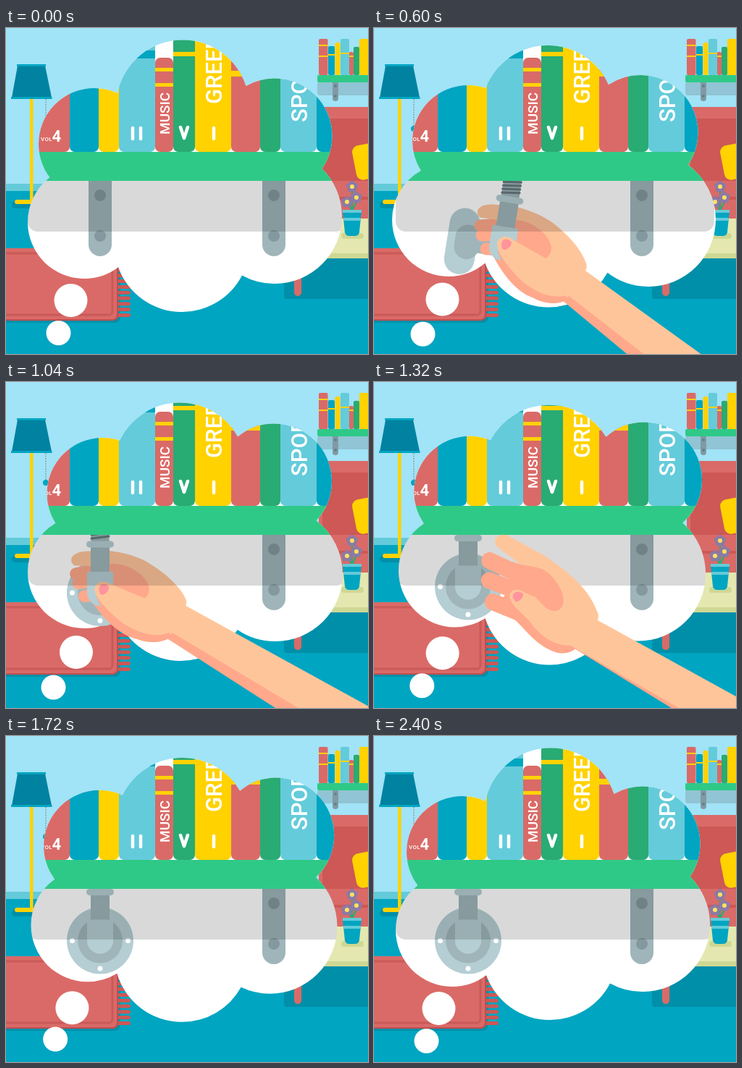
These frames come from a looping animation (500 by 450 pixels, 2480 ms). An HTML page:

```html
<!DOCTYPE html>
<html lang="en">
<head>
<meta charset="utf-8">
<title>Shelf repair</title>
<style>
html, body { margin: 0; width: 100%; height: 100%; overflow: hidden; background: #00a5c1; }
svg { display: block; width: 500px; height: 450px; }
text { font-family: Roboto, Inter, sans-serif; font-weight: 500; fill: #fff; }
.red { fill: #da6a67; } .dred { fill: #cd5855; }
.blue { fill: #00a5c1; } .sky { fill: #64cbda; }
.yel { fill: #ffd200; } .grn { fill: #29ab74; }
.mint { fill: #2fc987; } .deep { fill: #008fa8; }
.metal { fill: #9fb5ba; } .light { fill: #b5ced3; } .hole { fill: #84999f; }
.skin { fill: #ffc59a; } .pink { fill: #ffa88b; } .nail { fill: #ff949c; }
.white { fill: #fff; }
.finger { fill: none; stroke: #ffa88b; stroke-linecap: round; }
.shade { mix-blend-mode: multiply; }
</style>
</head>
<body>
<svg viewBox="0 0 500 450">
<defs>
  <clipPath id="cloud"></clipPath>
  <g id="plate">
    <path class="metal" d="M-16-24H16V68A16 16 0 0 1-16 68Z"/>
    <circle class="hole" r="8"/><circle class="hole" cy="56" r="8"/>
  </g>
</defs>

<!-- room -->
<rect width="500" height="216" fill="#a1e3f7"/>
<rect class="sky" y="215" width="500" height="10"/>
<rect class="blue" y="225" width="500" height="225"/>
<rect class="deep" x="8" y="239" width="50" height="10" rx="5"/>
<rect class="yel" x="33" y="97" width="4.5" height="143"/>
<rect class="yel" x="12" y="237" width="46" height="6" rx="3"/>
<path d="M55 98V136" stroke="#8fb4c0" stroke-width="2" stroke-dasharray="2 1.5"/>
<circle class="blue" cx="55" cy="139" r="4"/>
<path d="M16 52H54L63 96H8Z" fill="#0082a0"/>
<path class="blue" d="M15 50H55V53H15ZM7 95H63.500V98H7Z"/>

<rect class="deep" x="-10" y="306" width="168" height="101" rx="8"/>
<g id="fringe" stroke="#cd5855" stroke-width="5" stroke-linecap="round"></g>
<rect fill="#bd4f51" x="-10" y="304" width="165" height="100" rx="7"/>
<rect class="red" x="-10" y="304" width="163" height="98" rx="6"/>
<rect x="-10" y="311" width="157" height="85" rx="5" fill="none" stroke="#c95a59" stroke-width="3"/>

<rect class="red" x="432" y="109" width="80" height="155" rx="6"/>
<path class="dred" d="M437 125H500V211H437Z"/>
<rect class="red" x="430" y="211" width="80" height="52"/>
<path class="dred" d="M430 233H500V237H430Z"/>
<rect class="yel" x="481" y="160" width="50" height="48" rx="9" transform="rotate(-11 500 185)"/>
<rect class="deep" x="384" y="318" width="130" height="56" rx="4"/>
<rect class="red" x="398" y="340" width="10" height="30" rx="5"/>
<path d="M400 263H500V312H400Z" fill="#e4e8b0"/>
<path d="M400 311H500V318H400Z" fill="#ced894"/>
<rect x="463" y="283" width="31" height="8" rx="4" fill="#ced894"/>
<path d="M478 252V220M478 252L470 238M478 252L486 236" stroke="#29ab74" stroke-width="2" fill="none"/>
<g id="flowers"></g>
<path class="blue" d="M465 253H491L488 282Q487 287 482 287H474Q469 287 468 282Z"/>
<path class="sky" d="M465 251H491V255H465ZM466 262H490L489.500 266H466.500Z"/>

<rect x="430" y="74" width="80" height="19" rx="4" fill="#91c4d4"/>
<path d="M451 75H459V97A4 4 0 0 1 451 97Z" fill="#7f9aa4"/>
<circle cx="455" cy="80" r="2" fill="#64808a"/><circle cx="455" cy="94" r="2" fill="#64808a"/>
<rect class="mint" x="430" y="65" width="80" height="10" rx="2"/>
<g id="smallBooks"></g>

<!-- thought bubble -->
<circle id="dotA" class="white" r="23"/>
<circle id="dotB" class="white" r="17"/>
<g clip-path="url(#cloud)">
  <rect class="white" width="500" height="450"/>
  <g id="books"></g>
  <path d="M175 138V153M186 138V153M287 138V153" stroke="#fff" stroke-width="4.500" stroke-linecap="round"/>
  <path d="M241 137L246 152L251 137" fill="none" stroke="#fff" stroke-width="4.500" stroke-linejoin="round" stroke-linecap="round"/>
  <text x="48" y="156" font-size="8" letter-spacing=".3">VOL</text>
  <text x="63.500" y="157" font-size="22" style="font-weight:700">4</text>
  <text transform="translate(226 147) rotate(-90)" font-size="19" >MUSIC</text>
  <text transform="translate(298 105) rotate(-90)" font-size="31">GREEN</text>
  <text transform="translate(416 130) rotate(-90)" font-size="31">SPORT</text>
  <use href="#plate" x="370" y="231"/>
  <use id="oldStill" href="#plate" x="130" y="231"/>
</g>

<!-- new pipe and the gripping hand -->
<g id="flange">
  <rect id="arm" class="metal" y="-13" height="26"/>
  <rect id="disc" class="light" y="-46" height="92"/>
  <rect id="hub"/>
  <g id="screws" class="white"><circle cx="-38.500" r="3.500"/><circle cx="38.500" r="3.500"/><circle cy="38.500" r="3.500"/></g>
</g>
<g id="gripBack">
  <path class="finger" d="M-30-30L10-33M-28-17L5-18M-22 2H0" stroke-width="17"/>
  <path class="pink" d="M-14 8C-2 34 20 62 42 69C58 78 72 76 82 72L400 336L460 300L90 20L20-5Z"/>
  <path class="skin" d="M-34-47C-36-57-22-61-8-59C20-60 54-46 70-34C96-14 112 8 116 22Q118 28 115 32L520 324L480 368L86 62L50 50L5 5L0-37L-26-41C-31-41-33-43-34-47Z"/>
  <path class="pink" d="M18-38C40-38 66-18 68 0C68 14 56 20 45 14L15-8Z"/>
</g>
<g id="pipe">
  <rect class="metal" x="-12.500" y="-95" width="25" height="26" rx="2"/>
  <path d="M-12-90L12-93M-12-85L12-88M-12-80L12-83M-12-75L12-78" stroke="#66797f" stroke-width="3" stroke-linecap="round"/>
  <rect class="metal" x="-13" y="-64" width="26" height="38"/>
  <rect class="light" x="-19" y="-71.500" width="38" height="9" rx="4.500"/>
  <path class="light" d="M-18-29H18V0A18 18 0 0 1-18 0Z"/>
</g>
<g id="gripThumb">
  <path class="skin" d="M-7-3C-8-16 8-18 16-10L62 16L94 66C72 82 46 68 26 46C14 32-4 14-7-3Z"/>
  <path d="M-6 2C2 22 22 46 44 58C60 67 76 70 88 66L90 72C74 82 48 76 32 62C14 46-4 20-6 2Z" class="pink"/>
  <path class="nail" d="M-1-4C-1-13 9-14 13-7C13-1 6 4 2 3Q-1 1-1-4Z"/>
</g>

<g class="shade" clip-path="url(#cloud)">
  <rect x="30" y="195" width="440" height="86" rx="14" fill="#d9d9d9"/>
</g>
<g clip-path="url(#cloud)">
  <g id="oldFall">
    <use href="#plate"/>
    <rect x="-19" y="-27" width="38" height="5" rx="1" fill="#7c9096"/>
  </g>
  <rect class="mint" x="20" y="171" width="460" height="40"/>
</g>

<!-- open hand leaving -->
<g id="open">
  <path class="finger" d="M320 240L375 278M315 267L368 298M315 297L368 330" stroke-width="23"/>
  <path class="pink" d="M318 306C345 318 352 356 382 376C394 385 408 385 416 380L740 664L790 640L420 330L360 262Z"/>
  <path class="skin" d="M333 222C327 208 345 202 355 214L396 246C434 282 450 308 455 336Q456 342 453 346L800 622L760 664L410 374C390 372 372 355 362 335C354 320 340 308 339 296C338 284 352 282 361 292L373 300L366 258Z"/>
  <path class="pink" d="M350 246C366 258 388 256 400 274C416 298 416 322 399 324C384 323 378 302 366 290Z"/>
  <path class="nail" d="M343 296C343 288 352 286 358 293C357 299 350 303 346 302Z"/>
</g>
</svg>

<script>
const $ = id => document.getElementById(id);
const NS = "http://www.w3.org/2000/svg";
const LOOP = 2480, STEP = 40, END = 2400;

function set(el, attrs) {
  for (const k in attrs) el.setAttribute(k, attrs[k]);
  return el;
}
const add = (parent, tag, attrs) => parent.appendChild(set(document.createElementNS(NS, tag), attrs));

function book(parent, cls, x, w, top, bottom, r, bands = []) {
  add(parent, "rect", { class: cls, x, y: top, width: w, height: bottom - top, rx: r });
  for (const [y, h, c] of bands) add(parent, "rect", { class: c || "yel", x, y, width: w, height: h });
}

[["red", 28, 60, 0], ["blue", 88, 40, 0], ["yel", 128, 28, 0],
 ["sky", 156, 50, 0, [[31, 11, "blue"]]],
 ["red", 206, 25, 41, [[55, 5], [76, 5]]],
 ["grn", 231, 30, 0, [[33, 6]]], ["yel", 261, 50, 0],
 ["red", 311, 40, 0, [[59, 8]]], ["grn", 351, 28, 0],
 ["sky", 379, 50, 0], ["blue", 429, 40, 0]
].forEach(([c, x, w, top, bands]) => book($("books"), c, x, w, top, 171, 7, bands));

[["red", 432, 12.5, 15, [[23, 2], [38, 2]]], ["blue", 445, 9, 25, [[36, 2]]], ["yel", 454.5, 7, 20],
 ["sky", 462, 12, 15, [[34, 2]]], ["red", 474, 6, 33, [[38, 2]]],
 ["grn", 480, 8, 26], ["yel", 488, 14, 15]
].forEach(([c, x, w, top, bands]) => book($("smallBooks"), c, x, w, top, 65, 2, bands));

for (let y = 334; y < 399; y += 7.8) add($("fringe"), "path", { d: `M150 ${y}H169.500` });
for (const [x, y] of [[478, 219], [471, 240], [484, 234]]) {
  for (let a = 0; a < 5; a++) {
    add($("flowers"), "circle", { cx: x + 4.5 * Math.sin(a * 1.257), cy: y - 4.5 * Math.cos(a * 1.257), r: 3.6, fill: "#8b7aa8" });
  }
  add($("flowers"), "circle", { cx: x, cy: y, r: 3, fill: "#ffe45c" });
}

// Smooth curve through knots, without overshoot; slopes wrap around the loop.
function curve(ts, vs) {
  const n = ts.length - 1;
  const s = vs.slice(1).map((v, i) => (v - vs[i]) / (ts[i + 1] - ts[i]));
  const m = vs.map((_, i) => {
    const a = s[(i + n - 1) % n], b = s[i % n];
    return a * b > 0 ? 2 * a * b / (a + b) : 0;
  });
  return t => {
    if (t <= ts[0]) return vs[0];
    if (t >= ts[n]) return vs[n];
    let i = 0;
    while (t > ts[i + 1]) i++;
    const h = ts[i + 1] - ts[i], u = (t - ts[i]) / h, w = 1 - u;
    return vs[i] * w * w * (1 + 2 * u) + vs[i + 1] * u * u * (3 - 2 * u)
      + h * u * w * (m[i] * w - m[i + 1] * u);
  };
}

const BEAT = [0, 320, 600, 1040, 1480, 2040, END];
const drift = v => curve(BEAT, [...v, v[0]]);
const puff = (r, xs, ys) => ({
  el: add($("cloud"), "circle", { r }), x: drift(xs), y: drift(ys)
});
const drifting = [
  puff(77, [122, 126, 130, 133.5, 131, 126], [160, 158, 156, 154, 151, 154.5]),
  puff(92, [244, 241.5, 240, 240, 243, 244], [108.5, 112.5, 116, 120.5, 124.5, 115.5]),
  puff(79.5, [371, 369.5, 368, 370.5, 374.5, 372], [149, 147, 144.5, 137, 134.5, 143.5]),
  puff(78, [108, 105, 103, 108, 113, 111], [268, 266.5, 265, 262, 260, 264.5]),
  puff(93.5, [243, 242, 241, 241, 243, 243], [298.5, 295, 292, 291.5, 300, 302]),
  puff(93, [371, 376, 379, 372, 363, 368], [260, 260, 264, 265, 264, 261]),
  { el: $("dotA"), x: drift([89.5, 92.5, 94.5, 97, 93, 90]), y: drift([376, 375.5, 374.5, 373, 375, 375.5]) },
  { el: $("dotB"), x: drift([72.5, 70, 67.5, 65.5, 67, 70]), y: drift([421, 422, 422.5, 421.5, 418.5, 418.5]) }
];
// Solid core so that no gap opens between the puffs.
add($("cloud"), "rect", { x: 110, y: 140, width: 270, height: 150 });

const pipe = {
  x: curve([40, 180, 320, 460, 600, 740, 1250], [640, 500, 367, 256, 177, 130, 130]),
  y: curve([40, 180, 320, 460, 600, 740, 1040, 1250], [455, 400, 351, 318, 303, 303.5, 291, 282.5]),
  turn: curve([40, 320, 600, 760], [18, 15, 9, 0]),
  reach: curve([320, 600, 760], [101, 56, 0]),
  half: curve([320, 600, 760], [4, 21, 46])
};
const gripTurn = curve([40, 320, 600, 1040, 1250], [20, 13, 0, -7, -8]);
const open = {
  x: curve([1240, 1360, 1480, 1640, 1840], [-212, -115, 0, 150, 340]),
  y: curve([1240, 1360, 1480, 1640, 1840], [-8, -8, 0, 70, 230]),
  turn: curve([1240, 1480, 1840], [-14, 0, 10])
};

const show = (id, on) => { $(id).style.display = on ? "" : "none"; };
const place = (id, x, y, turn) => set($(id), { transform: `translate(${x} ${y}) rotate(${turn})` });

function drawPipe(t) {
  const x = pipe.x(t), y = pipe.y(t), turn = pipe.turn(t);
  const reach = pipe.reach(t), half = pipe.half(t), k = (half - 4) / 42;
  place("flange", x, y, turn);
  place("pipe", x, y, turn);
  set($("arm"), { x: -reach, width: reach });
  set($("disc"), { x: -reach - half, width: 2 * half, rx: half, ry: half });
  const w = 8 + 23 * k, h = 19 + 12 * k;
  set($("hub"), {
    x: -reach + 12 * (1 - k) - w, y: -h, width: 2 * w, height: 2 * h, rx: w, ry: w,
    class: half < 12 ? "light" : "metal"
  });
  show("screws", half > 42);
  for (const id of ["gripBack", "gripThumb"]) place(id, x, y, gripTurn(t));
}

function draw(t) {
  for (const d of drifting) set(d.el, { cx: d.x(t), cy: d.y(t) });

  const fall = (t / 320) ** 2;
  show("oldStill", t === 0);
  show("oldFall", t > 0 && t < 720);
  place("oldFall", 130 - 10 * fall, 231 + 57 * fall, 40 * fall);

  const gripping = t > 0 && t < 1240;
  show("flange", t > 0);
  show("pipe", t > 0);
  show("gripBack", gripping);
  show("gripThumb", gripping);
  drawPipe(t);

  show("open", t >= 1240 && t < 1840);
  set($("open"), { transform: `translate(${open.x(t)} ${open.y(t)}) rotate(${open.turn(t)} 400 320)` });
}

const start = performance.now();
function tick() {
  const t = (performance.now() - start) % LOOP;
  draw(Math.min(END, Math.floor(t / STEP) * STEP));
  requestAnimationFrame(tick);
}
tick();
</script>
</body>
</html>
```
